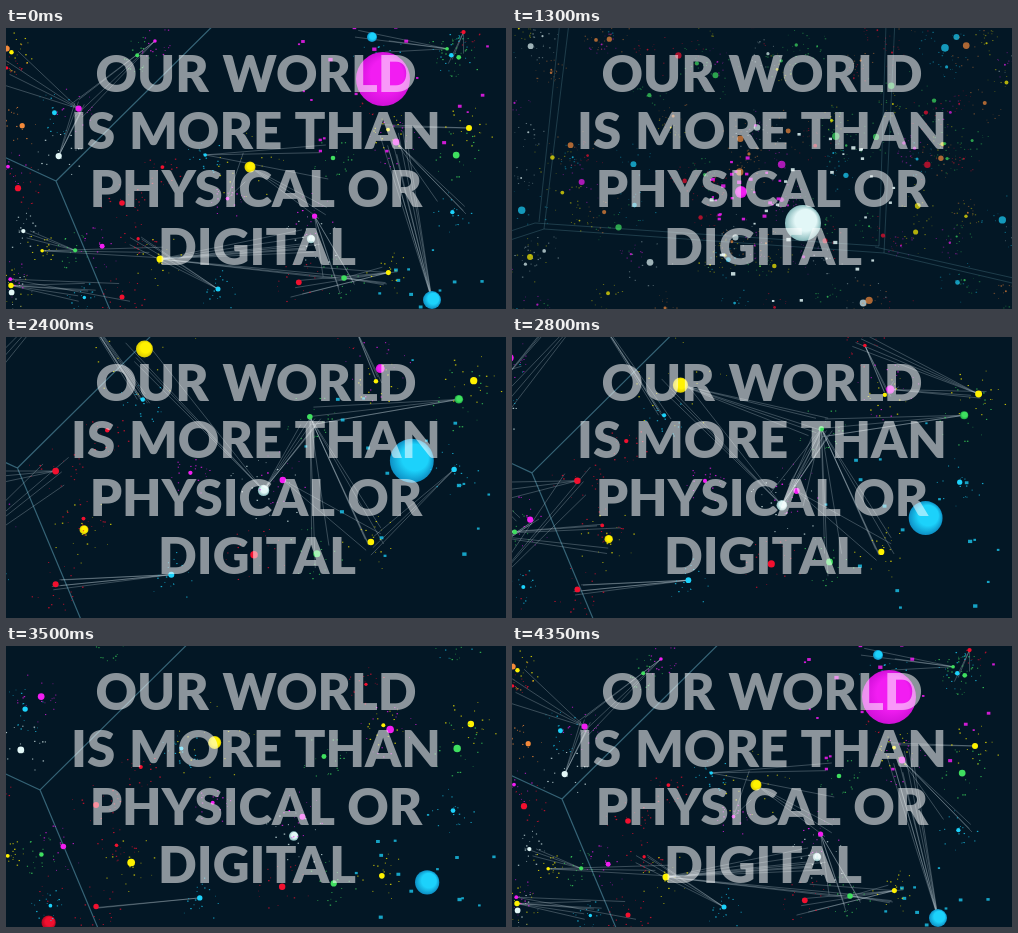
An HTML page with a canvas that plays this animation: 500 px wide and 281 px high, repeating every 4400 ms.

```html
<!DOCTYPE html>
<html lang="en">
<head>
<meta charset="utf-8">
<title>Our world</title>
<style>
html, body { margin: 0; width: 100%; height: 100%; overflow: hidden; background: #031725; }
canvas, svg { position: absolute; left: 0; top: 0; width: 100vw; height: 100vh; }
text { font: 900 51px Lato, "Open Sans", sans-serif; word-spacing: 2px; fill: #fff; fill-opacity: .54; text-anchor: middle; }
</style>
</head>
<body>
<canvas id="stage" width="500" height="281"></canvas>
<svg viewBox="0 0 500 281">
  <text x="250" y="63.5">OUR WORLD</text>
  <text x="250" y="121">IS MORE THAN</text>
  <text x="250" y="179">PHYSICAL OR</text>
  <text x="251" y="237">DIGITAL</text>
</svg>
<script>
const ctx = document.getElementById('stage').getContext('2d');
const LOOP = 4400, STEP = 50;
const COLORS = { y: '#fff200', m: '#f21df2', w: '#e2f7f7', g: '#3fdf5f', r: '#f2102f', b: '#1cd2fb', o: '#f58a3a' };
const SHADES = { y: '#d8c800', m: '#d010d8', w: '#86b8ba', g: '#1fa845', r: '#b0061e', b: '#0d8fc4', o: '#c0621c' };
const PALETTE = Object.keys(COLORS);

const clamp = v => Math.max(0, Math.min(1, v));
const ramp = (t, a, b) => clamp((t - a) / (b - a));
const mix = (a, b, k) => a + (b - a) * k;

let seed = 20771;
function rnd() {
  seed = seed * 16807 % 2147483647;
  return seed / 2147483647;
}
const between = (a, b) => mix(a, b, rnd());
const pick = list => list[Math.floor(rnd() * list.length)];
const repeat = (count, make) => Array.from({ length: count }, (_, i) => make(i));

// Points inside a disc of radius 1.
const cloud = count => repeat(count, () => {
  const angle = between(0, 2 * Math.PI), d = Math.sqrt(rnd());
  return { x: Math.cos(angle) * d, y: Math.sin(angle) * d, size: between(.5, 1.1) };
});
const ball = (color, x, y, r, near = .17, specks = 18) => ({ color, x, y, r, near, specks: cloud(specks) });

// Landmarks of the network; the last value is the nearness to the camera.
const marks = {
  sun: ball('y', 244, 139, 5.5, .35),
  lamp: ball('y', 154, 231, 3.5, .21),
  east: ball('y', 463, 100, 3),
  pink: ball('m', 390, 114, 3.4, .24),
  pearl: ball('w', 305, 211, 4.2, .26),
  leaf: ball('g', 338, 250, 2.8, .21),
  moss: ball('g', 327, 130, 2.3),
  ruby: ball('r', 116, 175, 2.8),
  coal: ball('r', 116, 269, 2.5),
  ember: ball('r', 105, 292, 6, .36),
  planet: ball('b', 426, 272, 9, .59),
  drop: ball('b', 212, 261, 2.5),
  sky: ball('b', 366, 9, 5, .8)
};
const network = Object.values(marks).concat(repeat(34, () =>
  ball(pick(PALETTE), 480 * rnd() ** 1.5, between(0, 275), between(1.5, 3.4), between(.14, .24))));

const corner = [
  ball('r', 78, 41, 5), ball('w', 492, 94, 7.5), ball('w', 194, 240, 4.3),
  ball('b', 310, 39, 4.8), ball('b', 426, 240, 4.6), ball('m', 170, 95, 6),
  ...repeat(24, () => ball(pick(PALETTE), between(0, 500), 190 * rnd() ** 1.3, between(1.8, 3.4)))
];
const crowd = repeat(210, () =>
  ball(pick(PALETTE), between(-60, 560), 350 * rnd() ** 1.3 - 35, .9 + 3 * rnd() ** 2, 0, 12));

// Bundles of threads run from one ball to a loose bunch around another.
const bundle = (hub, target, spread, count, start, end) =>
  ({ hub, target, spread, start, end, ends: cloud(count) });
const BURSTS = [[1900, 2900], [2700, 3500], [4100, 4750]];
const bundles = [
  bundle(marks.pearl, marks.moss, 12, 6, 1900, 2900),
  bundle(marks.pearl, marks.sun, 20, 4, 1900, 3500),
  bundle(marks.drop, marks.coal, 9, 5, 1900, 2900),
  bundle(marks.pink, marks.east, 10, 3, 2700, 3500),
  bundle(marks.moss, { x: 250, y: 64, near: .25 }, 15, 16, 3600, 4050),
  bundle(marks.drop, marks.coal, 2, 2, 3500, 4050),
  bundle(marks.planet, marks.pink, 18, 8, 4100, 4750),
  bundle(marks.lamp, marks.pearl, 14, 7, 4100, 4750),
  bundle(marks.lamp, marks.leaf, 6, 3, 4100, 4750)
];
for (const [start, end] of BURSTS) {
  for (let i = 0; i < 18; i++) {
    const hub = pick(network);
    const close = network.filter(n => n !== hub && Math.hypot(n.x - hub.x, n.y - hub.y) < 130);
    if (close.length) {
      bundles.push(bundle(hub, pick(close), between(6, 24), 2 + Math.floor(rnd() * 4), start + between(0, 150), end - between(0, 150)));
    }
  }
}

// Balls that cross several views; keys are time, x, y, radius.
const travellers = [
  { color: 'm', specks: cloud(24), keys: [[3850, 372, -60, 36], [4350, 377, 51, 27], [4400, 377, 51, 27], [5000, 178, 144, 22], [5700, 229, 164, 6], [6400, 240, 170, 0]] },
  { color: 'w', specks: cloud(30), keys: [[4650, 530, 240, 8], [5000, 383, 216, 11], [5700, 291, 195, 18], [6500, 262, 150, 0]] }
];
const jags = repeat(14, () => between(.85, 1.15));

function disc(x, y, r, color) {
  let fill = COLORS[color];
  if (r > 4) {
    fill = ctx.createRadialGradient(x + r * .15, y - r * .15, r * .6, x, y, r);
    fill.addColorStop(0, COLORS[color]);
    fill.addColorStop(1, SHADES[color]);
  }
  ctx.fillStyle = fill;
  ctx.beginPath();
  ctx.arc(x, y, r, 0, 7);
  ctx.fill();
}
function jaggedDisc(x, y, r, color, turn) {
  ctx.fillStyle = COLORS[color];
  ctx.beginPath();
  jags.forEach((jag, i) => {
    const a = i / jags.length * 2 * Math.PI + turn;
    ctx.lineTo(x + Math.cos(a) * r * jag * 1.1, y + Math.sin(a) * r * jag * .9);
  });
  ctx.fill();
}
function scatter(x, y, r, scale, color, specks, size) {
  const reach = Math.min(110, 10 * scale + 5 * r);
  ctx.fillStyle = COLORS[color];
  for (const p of specks) {
    ctx.fillRect(x + p.x * reach, y + p.y * reach, p.size * size, p.size * size * .8);
  }
}
function drawNodes(nodes, project, speckAlpha) {
  const alpha = ctx.globalAlpha;
  for (const n of nodes) {
    const p = project(n);
    if (!p) continue;
    ctx.globalAlpha = alpha * speckAlpha;
    scatter(p.x, p.y, n.r * p.s, p.s, n.color, n.specks, n.r >= 9 ? 4 : 1.4);
    ctx.globalAlpha = alpha;
    disc(p.x, p.y, n.r * p.s, n.color);
  }
}
function drawLines(lines, project, style, width) {
  ctx.strokeStyle = style;
  ctx.lineWidth = width;
  ctx.beginPath();
  for (const [x1, y1, x2, y2] of lines) {
    const a = project({ x: x1, y: y1, near: .09 }), b = project({ x: x2, y: y2, near: .09 });
    ctx.moveTo(a.x, a.y);
    ctx.lineTo(b.x, b.y);
  }
  ctx.stroke();
}
function drawBundles(time, project) {
  ctx.strokeStyle = 'rgba(205,220,228,.34)';
  ctx.lineWidth = .8;
  ctx.beginPath();
  for (const { hub, target, spread, start, end, ends } of bundles) {
    const a = project(hub), b = project(target);
    if (time < start || time >= end || !a || !b) continue;
    for (const p of ends) {
      ctx.moveTo(a.x, a.y);
      ctx.lineTo(b.x + p.x * spread, b.y + p.y * spread);
    }
  }
  ctx.stroke();
}

// The camera backs away from a vanishing point at constant speed.
function drawNetwork(time) {
  const late = Math.max(0, time - LOOP);
  const u = Math.min(1, (time - 2400) / 1950) + late / 1950, pan = late / 600;
  const project = ({ x, y, near }) => {
    const depth = 1 - near * (1 - u);
    if (depth < .08) return null;
    return { s: 1 / depth, x: 440 + (x - 440) / depth - 215 * pan, y: 375 + (y - 375) / depth + 22 * pan };
  };
  drawLines([[50, 153, -60, 102], [50, 153, 120, 320], [50, 153, 230, -25]], project, 'rgba(88,150,172,.6)', 1.2);
  drawBundles(time, project);
  drawNodes(network, project, .75);
}
const zoomer = (zoom, dx = 0, dy = 0) => ({ x, y }) =>
  ({ s: zoom, x: 250 + (x - 250) * zoom + dx, y: 140 + (y - 140) * zoom + dy });
function drawCorner(time) {
  const q = (time - 600) / 600;
  const project = zoomer(1 - .2 * q, q < 0 ? -215 * q : -60 * q, 22 * q);
  drawLines([[181, 5, -220, 94], [181, 5, 700, 151], [181, 5, 181, -90]], project, 'rgba(72,132,166,.7)', 1.4);
  drawNodes(corner, project, .65);
}
function drawCrowd(time) {
  const project = zoomer(1 / (1 + .25 * (time - 1300) / 1000));
  const room = [[60, -30, 32, 201], [384, -30, 372, 225], [32, 201, -60, 231], [32, 201, 372, 225], [372, 225, 560, 269]];
  const inner = room.map(([a, b, c, d]) => [a - 9, b - 6, c - 5, d - 7]);
  drawLines([...room, ...inner], project, 'rgba(95,150,165,.42)', 1);
  drawNodes(crowd, project, .55);
}
function drawTravellers(time) {
  for (const { color, specks, keys } of travellers) {
    const i = keys.findIndex(k => k[0] > time);
    if (i < 1) continue;
    const from = keys[i - 1], to = keys[i], k = ramp(time, from[0], to[0]);
    const [x, y, r] = [1, 2, 3].map(j => mix(from[j], to[j], k));
    ctx.globalAlpha = .85;
    scatter(x, y, r, 1, color, specks, 4);
    ctx.globalAlpha = 1;
    if (color === 'm' && time > 4850 && time < 5250) jaggedDisc(x, y, r, color, time);
    else disc(x, y, r, color);
  }
}
function layer(alpha, draw, time) {
  if (alpha <= 0) return;
  ctx.globalAlpha = alpha;
  draw(time);
  ctx.globalAlpha = 1;
}
function frame(now) {
  const t = Math.floor(now % LOOP / STEP) * STEP;
  ctx.fillStyle = '#031725';
  ctx.fillRect(0, 0, 500, 281);
  layer(t < 1000 ? 1 - ramp(t, 200, 450) : ramp(t, 1650, 2050), drawNetwork, t < 1000 ? t + LOOP : t);
  layer(Math.min(ramp(t, 150, 450), 1 - ramp(t, 850, 1150)), drawCorner, t);
  layer(.7 * Math.min(ramp(t, 850, 1150), 1 - ramp(t, 1650, 2100)), drawCrowd, t);
  drawTravellers(t < 3800 ? t + LOOP : t);
  requestAnimationFrame(frame);
}
requestAnimationFrame(frame);
</script>
</body>
</html>
```
